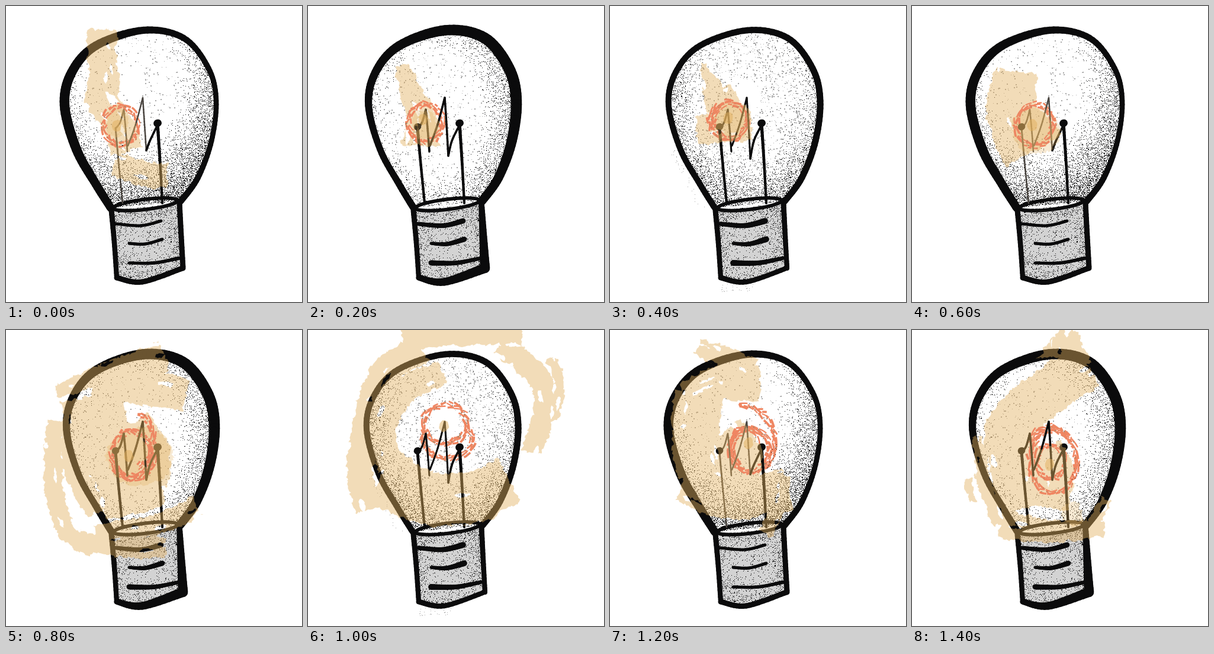
These frames come from a looping animation (500x500 px, 1.6 s). An HTML page with a canvas:

```html
<!DOCTYPE html>
<html lang="en">
<head>
<meta charset="utf-8">
<title>Light bulb</title>
<style>
html, body { margin: 0; width: 100%; height: 100%; overflow: hidden; background: #fff; }
canvas { display: block; width: 500px; height: 500px; }
</style>
</head>
<body>
<canvas id="stage" width="500" height="500"></canvas>
<script>
const stage = document.getElementById('stage');
const ctx = stage.getContext('2d');
const layer = document.createElement('canvas');
layer.width = layer.height = 500;
const lit = layer.getContext('2d');
const INK = '#0b0b0c', EMBER = '#ef8662', GLOW = 'rgb(227,177,95)';
const STEP = 200, TAU = Math.PI * 2;

let seed = 1;
function rnd() {
  seed = (seed + 0x6D2B79F5) | 0;
  let t = Math.imul(seed ^ (seed >>> 15), 1 | seed);
  t = (t + Math.imul(t ^ (t >>> 7), 61 | t)) ^ t;
  return ((t ^ (t >>> 14)) >>> 0) / 4294967296;
}
const jitter = n => (rnd() - 0.5) * 2 * n;
const mix = (a, b, t) => a + (b - a) * t;
const points = s => s.split(' ').map(p => p.split(',').map(Number));

// Catmull-Rom through the points
function smooth(pts) {
  const last = pts.length - 1, out = [];
  const at = i => pts[Math.max(0, Math.min(last, i))];
  for (let i = 0; i < last; i++) {
    const [a, b, c, d] = [at(i - 1), at(i), at(i + 1), at(i + 2)];
    for (let k = 0; k < 10; k++) {
      const t = k / 10;
      out.push([0, 1].map(j => b[j] + 0.5 * t * (c[j] - a[j] +
        t * (2 * a[j] - 5 * b[j] + 4 * c[j] - d[j] + t * (3 * (b[j] - c[j]) + d[j] - a[j])))));
    }
  }
  out.push(pts[last]);
  return out;
}
function shape(pts) {
  const p = new Path2D();
  pts.forEach(([x, y]) => p.lineTo(x, y));
  p.closePath();
  return p;
}

// Line whose width follows width(share of length, x, y)
function line(pts, width, color = INK) {
  ctx.strokeStyle = color;
  ctx.lineCap = 'round';
  for (let i = 1; i < pts.length; i++) {
    ctx.lineWidth = width(i / pts.length, ...pts[i]);
    ctx.beginPath();
    ctx.moveTo(...pts[i - 1]);
    ctx.lineTo(...pts[i]);
    ctx.stroke();
  }
}
const brush = (s, w0, w1 = w0, color) => line(smooth(points(s)), t => mix(w0, w1, t), color);
function dot(x, y, r) {
  ctx.fillStyle = INK;
  ctx.beginPath();
  ctx.ellipse(x, y, r, r * 0.93, -0.4, 0, TAU);
  ctx.fill();
}

const BODY = smooth(points('177,341 152,301 119,242 99,168 111,112 152,67 232,41 300,54 342,105 355,160 347,228 324,290 295,330'));
const FOOT = ['178,345 183,400 187,459', '187,459 230,466 298,443', '293,333 296,390 299,443'];
const BASE = shape(points('178,345 187,459 230,466 298,443 293,333'));
const COLLAR = new Path2D();
COLLAR.ellipse(236, 335, 55, 8.5, -0.12, 0, TAU);

// pen: mean outline width, its swing and the direction of the thickest side
const poses = {
  A: { pen: [12.5, 4, Math.PI], squeeze: 1, focus: [212, 130], grey: 0.014, wire: [3, 2.5, '#4a4540'], dip: 244, band: 5, heel: 9, dust: 0 },
  B: { pen: [10.5, 0.5, 0], squeeze: 1, focus: [232, 150], grey: 0.035, wire: [5, 3, INK], dip: 258, band: 10, heel: 8, dust: 60 },
  C: { pen: [15, 4, -0.6], squeeze: 0.975, focus: [212, 180], grey: 0.016, wire: [5, 3.5, INK], dip: 253, band: 9, heel: 17, dust: 0 }
};

function speck(x, y, s, color) {
  ctx.fillStyle = color;
  ctx.fillRect(Math.round(x), Math.round(y), s, s);
}
function stipple({ focus: [fx, fy], grey }, glass) {
  ctx.save();
  ctx.clip(glass);
  for (let y = 36; y < 346; y++) for (let x = 92; x < 360; x++) {
    const t = Math.hypot((x - fx) / 135, (y - fy) / 180), r = rnd();
    if (r < 0.85 * Math.max(0, t - 0.5) ** 2) speck(x, y, 1, INK);
    else if (r > 1 - grey && t > 0.15) speck(x, y, rnd() < 0.4 ? 2 : 1, '#a8a8a8');
  }
  ctx.restore();
  ctx.save();
  ctx.clip(BASE);
  for (let y = 334; y < 468; y++) for (let x = 178; x < 300; x++) {
    const t = Math.max(Math.abs(x - 238) / 56, Math.abs(y - 400) / 64);
    if (rnd() < 0.04 + 0.16 * t ** 3) speck(x, y, 1, INK);
  }
  ctx.restore();
}
function wires({ wire: [post, thin, color], dip, band }, hideDot) {
  brush('185,206 190,262 197,333', post, post * 0.8, color);
  brush('256,200 260,260 264,333', 5.5, 4);
  brush('186,206 193,196 199,175', thin, thin, color);
  brush('199,175 202,207 205,246', thin, thin, color);
  brush('206,236 219,200 231,155', thin, thin, color);
  brush(`231,155 234,200 237,${dip}`, thin, thin, color);
  brush(`237,${dip} 243,228 254,205`, 3.5);
  if (!hideDot) dot(185, 204, 6.4);
  dot(256, 198, 7);
  brush('186,368 228,371 262,363', mix(5, band, 0.4), band);
  brush('208,401 235,402 264,394', 5, band);
  brush('208,434 250,434 292,426', band, 6);
}
function lamp(name, hideDot) {
  const pose = poses[name], [mean, swing, side] = pose.pen;
  seed = name.charCodeAt(0) * 977;
  const body = BODY.map(([x, y]) => [230 + (x - 230) * pose.squeeze, y]);
  const glass = shape(body);
  for (const [path, color] of [[glass, '#fff'], [BASE, '#d3d3d3'], [COLLAR, '#fff']]) {
    ctx.fillStyle = color;
    ctx.fill(path);
  }
  for (let i = 0; i < pose.dust; i++) {
    const t = rnd();
    if (i % 2) speck(mix(108, 160, t) - rnd() * 12, mix(240, 340, t), 1, '#a8a8a8');
    else speck(186 + t * 60, 468 + rnd() * 14, 1, '#a8a8a8');
  }
  stipple(pose, glass);
  line(body, (t, x, y) => mean + swing * Math.cos(Math.atan2(y - 185, x - 226) - side));
  FOOT.forEach((s, i) => brush(s, 9, i ? pose.heel : 8));
  ctx.lineWidth = 6;
  ctx.strokeStyle = INK;
  ctx.stroke(COLLAR);
  wires(pose, hideDot);
}

// Outline torn by drifting random offsets
function ragged(pts, rough) {
  const out = [];
  let dx = 0, dy = 0;
  pts.forEach((a, i) => {
    const b = pts[(i + 1) % pts.length];
    const n = Math.max(1, Math.round(Math.hypot(b[0] - a[0], b[1] - a[1]) / 2.5));
    for (let k = 0; k < n; k++) {
      dx = dx * 0.6 + jitter(rough);
      dy = dy * 0.6 + jitter(rough);
      out.push([mix(a[0], b[0], k / n) + dx, mix(a[1], b[1], k / n) + dy]);
    }
  });
  return shape(out);
}
function blob(x, y, rx, ry, turn = 0, rough = 1.6) {
  const pts = [];
  for (let a = 0; a < TAU; a += TAU / 16) {
    const u = rx * Math.cos(a), v = ry * Math.sin(a);
    pts.push([x + u * Math.cos(turn) - v * Math.sin(turn), y + u * Math.sin(turn) + v * Math.cos(turn)]);
  }
  return ragged(pts, rough);
}

// Dry brush stroke: a torn ribbon and streaks of missing paint along it
function ribbon([s, w0, w1 = w0]) {
  const mid = smooth(points(s)), left = [], right = [], gaps = [];
  mid.forEach(([x, y], i) => {
    const a = mid[Math.max(0, i - 1)], b = mid[Math.min(mid.length - 1, i + 1)];
    const turn = Math.atan2(b[1] - a[1], b[0] - a[0]);
    const half = mix(w0, w1, i / mid.length) / 2;
    const nx = -Math.sin(turn), ny = Math.cos(turn);
    left.push([x + nx * half, y + ny * half]);
    right.unshift([x - nx * half, y - ny * half]);
    if (rnd() < 0.14) {
      const off = jitter(half);
      gaps.push(blob(x + nx * off, y + ny * off, 4 + rnd() * 11, 1.5 + rnd() * 3, turn));
    }
  });
  lit.fill(ragged([...left, ...right], 2.4));
  return gaps;
}
function paintLayer(alpha, draw) {
  lit.clearRect(0, 0, 500, 500);
  lit.globalCompositeOperation = 'source-over';
  lit.fillStyle = GLOW;
  draw();
  ctx.globalAlpha = alpha;
  ctx.drawImage(layer, 0, 0);
  ctx.globalAlpha = 1;
}
function light({ strokes, dark, ball }) {
  paintLayer(0.44, () => {
    const gaps = strokes.flatMap(ribbon);
    lit.globalCompositeOperation = 'destination-out';
    gaps.forEach(g => lit.fill(g));
  });
  if (dark) paintLayer(0.28, () => lit.fill(blob(...dark, 0, 3)));
  paintLayer(0.5, () => lit.fill(blob(...ball, 8, 10, 0, 0.8)));
}

// Broken crayon strokes along an arc
function scribble([cx, cy, rx, ry, from = 0, to = TAU]) {
  ctx.strokeStyle = EMBER;
  ctx.lineCap = 'butt';
  const r = (rx + ry) / 2;
  for (let pass = -1; pass <= 1; pass++) {
    for (let a = from + rnd() * 0.2; a < to;) {
      const len = (5 + rnd() * 11) / r, off = pass * 3 + jitter(2), lean = jitter(5);
      ctx.lineWidth = 2 + rnd() * 2.2;
      ctx.beginPath();
      for (let k = 0; k <= 3; k++) {
        const q = a + len * k / 3, d = off + lean * (k / 3 - 0.5);
        ctx.lineTo(cx + (rx + d) * Math.cos(q), cy + (ry + d) * Math.sin(q));
      }
      ctx.stroke();
      a += len + (rnd() * 4) / r;
    }
  }
}

// strokes: path, start width, end width; rings: centre, radii, angles
const scenes = [
  { pose: 'A', hideDot: true, ball: [187, 202], dark: [187, 195, 18, 28],
    strokes: [['163,40 161,80 166,120 162,160 190,200 205,245', 48, 56], ['182,268 230,282 272,286', 42]],
    rings: [[193, 202, 29, 33]] },
  { pose: 'C', ball: [194, 192], dark: [196, 200, 22, 25],
    strokes: [['158,100 176,150 192,195 190,235', 24, 70]],
    rings: [[198, 198, 29, 32]] },
  { pose: 'B', ball: [200, 189], dark: [205, 195, 32, 34],
    strokes: [['159,96 175,145 200,190', 6, 72], ['146,208 185,205 238,200', 46, 56], ['199,133 205,165', 10, 34]],
    rings: [[203, 194, 28, 31], [190, 197, 22, 29, 2.5, 4.4]] },
  { pose: 'A', ball: [203, 202], dark: [210, 210, 40, 40],
    strokes: [['175,110 170,180 205,245', 70, 110]],
    rings: [[207, 201, 31, 35]] },
  { pose: 'C', ball: [207, 213], dark: [226, 214, 58, 50],
    strokes: [['84,105 165,75 268,45', 20, 56], ['145,95 220,95 304,112', 66, 56], ['142,110 160,180 200,240 220,310', 105],
      ['116,130 112,220 155,310', 36], ['210,160 240,205 240,265', 70], ['84,155 80,230 90,310 135,360 270,368', 28, 36],
      ['150,342 250,330 322,298', 34]],
    rings: [[211, 209, 32, 38], [214, 213, 36, 39, -0.2, 2.5], [216, 185, 33, 46, -1.4, 1.2]] },
  { pose: 'B', ball: [230, 162],
    strokes: [['158,12 250,6 362,8', 44, 34], ['190,32 128,75 100,150 88,230 98,305', 52, 40], ['228,72 160,105 128,170 140,235', 44],
      ['125,245 190,280 270,285 340,252', 100, 80], ['325,25 385,75 400,130 378,205', 40, 34], ['408,48 424,80 416,150', 18]],
    rings: [[232, 158, 37, 33], [236, 186, 42, 31, -0.7, 3.5]] },
  { pose: 'A', ball: [234, 191],
    strokes: [['146,28 185,45 235,75', 24, 56], ['252,90 180,90 125,115', 60, 44], ['150,105 145,170 155,245', 82],
      ['125,255 200,285 300,268', 70], ['195,170 225,215 215,265', 64], ['292,245 288,290 262,344', 24]],
    rings: [[235, 202, 33, 38], [233, 200, 26, 31, 2, 5.5], [222, 190, 57, 62, -1.8, 0.7]] },
  { pose: 'C', ball: [232, 227], dark: [272, 311, 17, 21],
    strokes: [['264,0 258,50', 24, 100], ['302,62 235,100 168,165 178,230 192,300', 70, 100], ['114,180 120,250 148,330', 24],
      ['150,325 230,340 325,335', 50, 26], ['225,200 245,240 235,300', 56], ['328,285 305,325', 22], ['94,252 103,290', 12]],
    rings: [[238, 222, 40, 53], [235, 223, 25, 28], [232, 192, 32, 29, 3.2, 6]] }
];

function render(i) {
  const s = scenes[i];
  ctx.fillStyle = '#fff';
  ctx.fillRect(0, 0, 500, 500);
  lamp(s.pose, s.hideDot);
  seed = 4001 + i * 131;
  light(s);
  ctx.globalCompositeOperation = 'darken';
  s.rings.forEach(scribble);
  ctx.globalCompositeOperation = 'source-over';
}

let shown = -1;
function tick() {
  const i = Math.floor(performance.now() / STEP) % scenes.length;
  if (i !== shown) render(shown = i);
  requestAnimationFrame(tick);
}
tick();
</script>
</body>
</html>
```
